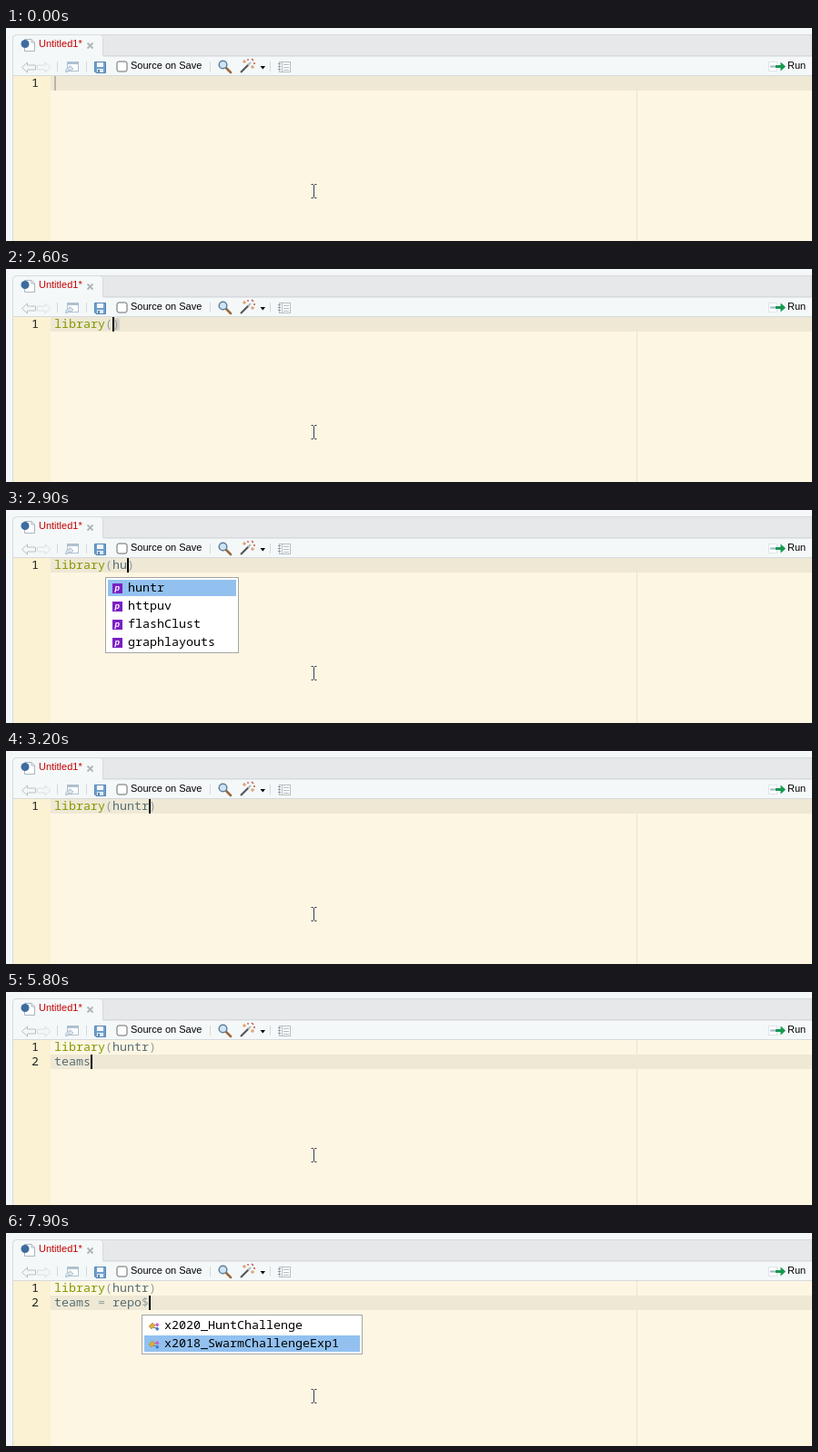
Recreate the animation shown at these times as an HTML page. Size 886 by 235 pixels, loop 8 s.

```html
<!DOCTYPE html>
<html lang="en">
<head>
<meta charset="utf-8">
<title>Script editor</title>
<style>
html, body { margin: 0; width: 100%; height: 100%; overflow: hidden; background: #f4f8f9; }
svg { display: block; }
rect { shape-rendering: crispEdges; }
.ui { font: 11px "Liberation Sans", Arial, sans-serif; }
.mono { font: 13.333px "Noto Sans Mono", "DejaVu Sans Mono", monospace; white-space: pre; }
.soft { shape-rendering: auto; }
</style>
</head>
<body>
<svg width="886" height="235" viewBox="0 0 886 235">
  <defs>
    <g id="pkg">
      <rect width="11" height="11" fill="#7a1fc4"/>
      <text x="2.6" y="8.3" fill="#fff" font-family="Liberation Sans, sans-serif" font-size="9" font-weight="bold" font-style="italic">p</text>
    </g>
    <g id="var">
      <path d="M0 6 4 2 7 5 3 9Z" fill="#d9ae3c" stroke="#a8822a" stroke-width=".6"/>
      <path d="M6 4.5H9M5 7.5H8" stroke="#888" fill="none"/>
      <path d="M9 2 11.5 4.3 9.3 6.5 7 4.3Z" fill="#c65cc8"/>
      <path d="M9 6.5 11.5 8.8 9.3 11 7 8.8Z" fill="#3b7ed2"/>
    </g>
  </defs>

  <!-- window frame, tab strip and toolbar -->
  <rect width="886" height="235" fill="#f4f8f9"/>
  <path class="soft" d="M7.5 235V11.5Q7.5 7.5 11.5 7.5H886V235Z" fill="#e6e8ea" stroke="#d6dadc"/>
  <rect x="8" y="31" width="878" height="22" fill="#f4f8f9"/>
  <rect x="106" y="30" width="780" height="1" fill="#d6dadc"/>
  <path d="M8 32V11.5Q8 8 11.5 8H103Q106.500 8 106.500 11.500V31H886" fill="none" stroke="#d6dadc"/>
  <path d="M8 32V12Q8 8 12 8H103Q106 8 106 11.500V32Z" fill="#f4f8f9"/>
  <rect x="8" y="52" width="878" height="1" fill="#d6dadc"/>

  <path d="M20.500 12.500H28L31.500 16V25.500H20.500Z" fill="#fff" stroke="#a9b6c0"/>
  <path d="M28 12.500V16H31.500" fill="none" stroke="#a9b6c0"/>
  <circle cx="21" cy="17.500" r="4.500" fill="#3d6c9f"/>
  <g class="ui">
    <text x="36" y="21" fill="#c40000">Untitled1*</text>
    <text x="137" y="45">Source on Save</text>
    <text x="859" y="45">Run</text>
  </g>
  <path d="M89.500 16.500 95.500 22.500M95.500 16.500 89.500 22.500" stroke="#b0b5b8" stroke-width="1.800"/>

  <g fill="#f4f6f7" stroke="#b9c0c4">
    <path d="M17.500 43.500 23.500 38V41H32.500V46H23.500V49Z"/>
    <path d="M49 43.500 43 38V41H34.500V46H43V49Z" stroke="#dce0e2"/>
  </g>
  <g fill="#d3d8da">
    <rect x="56" y="37" width="1" height="11"/>
    <rect x="88" y="37" width="1" height="11"/>
    <rect x="224" y="37" width="1" height="11"/>
    <rect x="290" y="37" width="1" height="11"/>
  </g>
  <g fill="#fff" stroke="#adc0cf">
    <rect x="67.500" y="37.500" width="12" height="10"/>
    <path d="M67 39H80" stroke-width="2"/>
    <path d="M65.500 48.500Q65.500 43.500 70 43.500V41.500L74 45 70 48V46Q67.500 46 67.500 48.500Z" fill="#dce8f1"/>
  </g>
  <path d="M97.500 37.500H109.500V49.500H99L97.500 48Z" fill="#6f9fce" stroke="#5584b5"/>
  <rect x="100" y="38" width="7" height="5" fill="#f3f8fc"/>
  <rect x="100" y="45" width="7" height="4" fill="#dfeaf4"/>
  <rect x="101" y="46" width="2" height="3" fill="#5584b5"/>
  <rect class="soft" x="122" y="37" width="11" height="11" rx="2" fill="#fff" stroke="#6b6b6b"/>

  <path d="M242 44 247 49" stroke="#9a6a3a" stroke-width="2.600" stroke-linecap="round"/>
  <circle cx="238.500" cy="40.500" r="4.300" fill="#cfe5f5" stroke="#5f7f99" stroke-width="1.500"/>
  <path d="M258 49 267 40" stroke="#555" stroke-width="2.200"/>
  <path d="M266 41 269 38" stroke="#bbb" stroke-width="2.200"/>
  <path d="M262 35V39M260 37H264M271 41V45M269 43H273" stroke="#d98a4e"/>
  <path d="M270 34 272 36M272 39H274M266 34V36" stroke="#c8503f" stroke-width="1.300"/>
  <path d="M279.500 42H285L282.250 45.500Z"/>
  <rect x="300.500" y="37.500" width="12" height="11" fill="#fff" stroke="#b4bdc4"/>
  <path d="M303.500 37V49M305 40.500H311M305 43.500H311M305 46.500H311" stroke="#b4bdc4"/>
  <path d="M299 39.500H302M299 42.500H302M299 45.500H302" stroke="#8b969e"/>

  <rect x="838.500" y="37.500" width="9" height="10" fill="#fff" stroke="#dfe4e7"/>
  <path d="M840 42.500H847" stroke="#9fb4c6" stroke-width="2"/>
  <path d="M846 41H851.500V37.500L857 42.500 851.500 47.500V44H846Z" fill="#149a50"/>

  <!-- editor -->
  <rect x="8" y="53" width="878" height="182" fill="#fdf6e3"/>
  <rect x="8" y="53" width="41" height="182" fill="#fbf1d3"/>
  <rect x="693" y="53" width="1" height="182" fill="#e9e3d1"/>
  <rect id="active" x="49" y="53" width="837" height="16" fill="#eee8d5"/>
  <rect id="match" class="soft" x="117" y="54" width="8" height="14" rx="2" fill="#d6d2c3"/>
  <g class="mono">
    <text x="28" y="65" fill="#222">1</text>
    <text id="num2" x="28" y="81" fill="#222">2</text>
    <text id="line1" x="53" y="65"></text>
    <text id="line2" x="53" y="81"></text>
  </g>
  <rect id="caret" width="2" height="16"/>
  <g id="popup" class="mono"></g>

  <path d="M335.500 172.500H337.500L338.500 173.500 339.500 172.500H341.500M338.500 173.500V186.500M335.500 187.500H337.500L338.500 186.500 339.500 187.500H341.500" fill="none" stroke="#fff" stroke-opacity=".6" stroke-width="2.400"/>
  <path d="M335.500 172.500H337.500L338.500 173.500 339.500 172.500H341.500M338.500 173.500V186.500M335.500 187.500H337.500L338.500 186.500 339.500 187.500H341.500" fill="none" stroke="#3a3a3a"/>
</svg>
<script>
const LOOP = 8000, CHAR = 8, LEFT = 53;
const $ = id => document.getElementById(id);

const pkgs = (items, w, h) => ({ x: 109, y: 74, icon: 'pkg', items: items.split(' '), w, h });
const vars = (items, x, sel = 0) => ({ x, y: 90, icon: 'var', items: items.split(' '), sel });
const members = 'x2020_HuntChallenge x2018_SwarmChallengeExp1';
const all = pkgs('huntr httpuv here highr hms htmltools htmlwidgets', 193, 158);
const some = pkgs('huntr httpuv flashClust graphlayouts');
const one = pkgs('huntr');
const team = vars('teams', 45);

// [start, first line, second line, extras]
const first = 'library(huntr)';
const off = { off: true };
const steps = [
  [0, '', null, off], [500, '', null], [1000, '', null, off],
  ...[...'librar'].map((c, i) => [1400 + i * 100, 'librar'.slice(0, i + 1), null]),
  [2100, 'library', null],
  [2400, 'library()', null], [2600, 'library()', null, { match: true }],
  [2800, 'library(h)', null, { popup: all }],
  [2900, 'library(hu)', null, { popup: some }],
  [3000, 'library(hun)', null, { popup: one }],
  [3100, 'library(hunt)', null, { popup: one }],
  [3200, first, null], [3800, first, null, off],
  [4200, first, ''], [4900, first, '', off],
  [5200, first, 'te'], [5300, first, 'tea'],
  [5600, first, 'team', { popup: team }],
  [5700, first, 'teams', { popup: team }],
  [5800, first, 'teams'],
  [6300, first, 'teams '], [6400, first, 'teams ='], [6500, first, 'teams = '],
  [6700, first, 'teams = r'], [6800, first, 'teams = rep'], [7000, first, 'teams = repo'],
  [7400, first, 'teams = repo$', { popup: vars(members, 149) }],
  [7900, first, 'teams = repo$', { popup: vars(members, 149, 1) }]
];

function colour(code) {
  return code.replace(/library(?=\()|\w+|[^\w\s]/g, t => {
    const fill = /^\W/.test(t) ? '#93a1a1'
      : t === 'library' && code.includes('(') ? '#859900' : '#586e75';
    return `<tspan fill="${fill}">${t}</tspan>`;
  });
}

function drawPopup(p) {
  if (!p) return '';
  const longest = Math.max(...p.items.map(s => s.length));
  const w = p.w || longest * CHAR + 51;
  const h = p.h || p.items.length * 20 + 4;
  const rows = p.items.map((name, i) => {
    const y = p.y + 2 + i * 20;
    const mark = i === (p.sel || 0)
      ? `<rect x="${p.x + 3}" y="${y + 1}" width="${w - 6}" height="18" fill="#92c1f0"/>` : '';
    return `${mark}<use href="#${p.icon}" x="${p.x + 8}" y="${y + 5}"/>` +
      `<text x="${p.x + 25}" y="${y + 14}">${name}</text>`;
  });
  return `<rect x="${p.x + .5}" y="${p.y + .5}" width="${w - 1}" height="${h - 1}" fill="#fff" stroke="#a5a5a5"/>` +
    rows.join('');
}

function show([, a, b, { off, match, popup } = {}]) {
  const second = b !== null;
  const col = second ? b.length : a.length - a.endsWith(')');
  const y = second ? 69 : 53;
  $('line1').innerHTML = colour(a);
  $('line2').innerHTML = colour(b || '');
  $('num2').style.display = second ? '' : 'none';
  $('match').style.display = match ? '' : 'none';
  $('active').setAttribute('y', y);
  $('caret').setAttribute('x', LEFT + col * CHAR);
  $('caret').setAttribute('y', y);
  $('caret').setAttribute('opacity', off ? .22 : 1);
  $('popup').innerHTML = drawPopup(popup);
}

let current;
function tick() {
  const t = performance.now() % LOOP;
  const step = steps.findLast(s => s[0] <= t);
  if (step !== current) show(current = step);
  requestAnimationFrame(tick);
}
tick();
</script>
</body>
</html>
```
